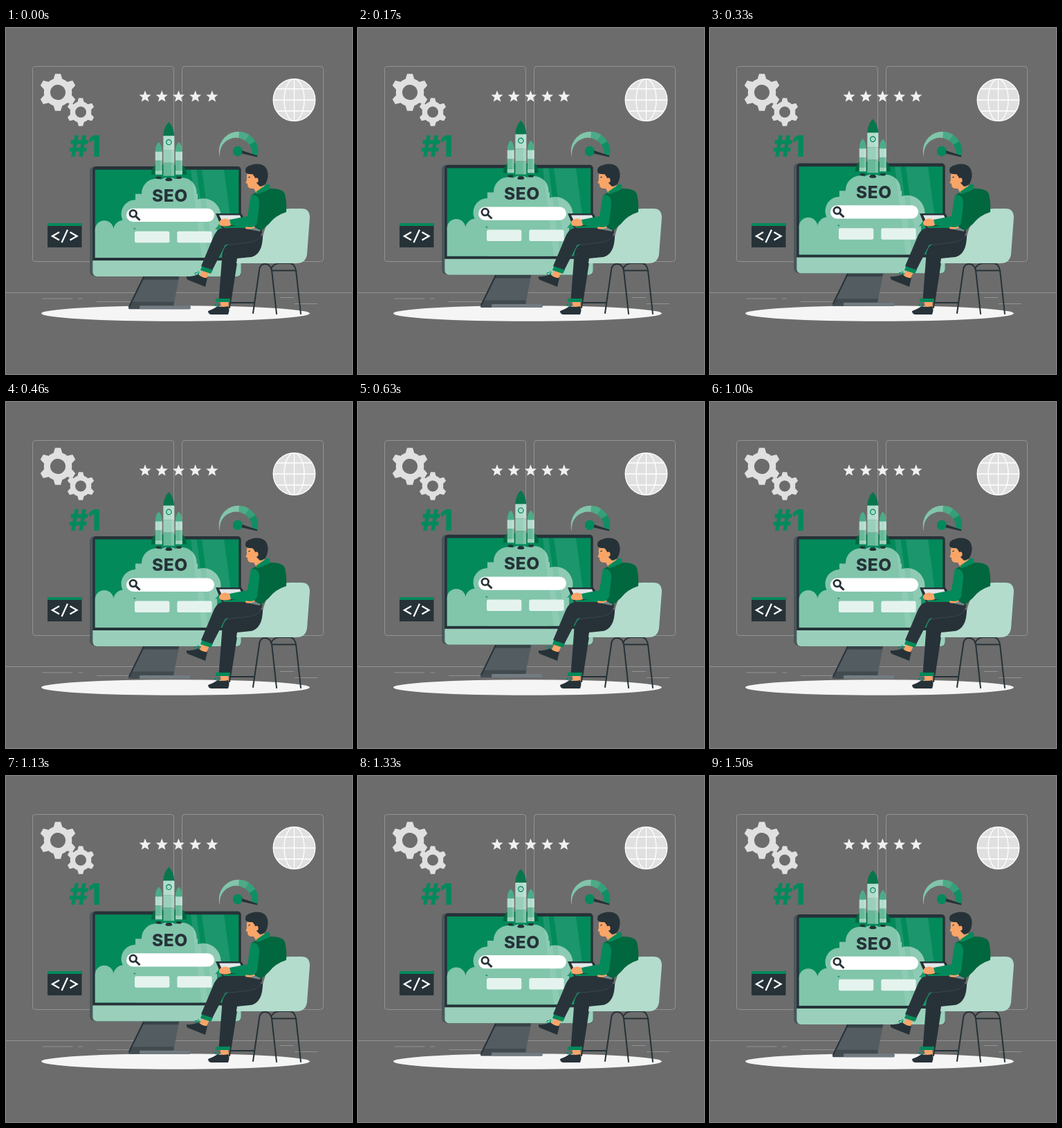
An HTML page with a canvas for the animation above (1.54 s loop, 500 by 500 pixels).

```html
<!DOCTYPE html>
<html lang="en">
<head>
<meta charset="utf-8">
<title>SEO launch</title>
<style>
  html, body { margin: 0; width: 100%; height: 100%; overflow: hidden; background: #6c6c6c; }
  canvas { display: block; width: 500px; height: 500px; }
</style>
</head>
<body>
<canvas id="stage"></canvas>
<script>
const LOOP = 1540, FPS = 24, FLOAT_PERIOD = 1500, FLOAT_HEIGHT = 10, PHASE = 20;
const BACK = '#6c6c6c', DARK = '#263238', GREEN = '#028a5b', DEEP = '#00673f',
  MINT = '#b3dccd', CHIN = '#9ad0bb', CLOUD = '#81c5ab', MID = '#4dab88',
  SKIN = '#f9a568', GREY = '#e0e0e0', LINE = '#989898';

const canvas = document.getElementById('stage');
const ctx = canvas.getContext('2d');
const ratio = window.devicePixelRatio || 1;
canvas.width = canvas.height = 500 * ratio;

function shape(d, color) {
  ctx.fillStyle = color;
  ctx.fill(new Path2D(d));
}
function stroke(d, color, width = 1) {
  ctx.strokeStyle = color;
  ctx.lineWidth = width;
  ctx.stroke(new Path2D(d));
}
function rect(x, y, w, h, color, radius = 0) {
  ctx.fillStyle = color;
  ctx.beginPath();
  ctx.roundRect(x, y, w, h, radius);
  ctx.fill();
}
function oval(x, y, rx, ry, color) {
  ctx.fillStyle = color;
  ctx.beginPath();
  ctx.ellipse(x, y, rx, ry, 0, 0, 7);
  ctx.fill();
}
const disc = (x, y, r, color) => oval(x, y, r, r, color);
function ring(x, y, rx, ry, color, width) {
  ctx.strokeStyle = color;
  ctx.lineWidth = width;
  ctx.beginPath();
  ctx.ellipse(x, y, rx, ry, 0, 0, 7);
  ctx.stroke();
}
function text(label, x, y, size, color, spacing = 0) {
  ctx.font = `800 ${size}px Inter, "Open Sans", sans-serif`;
  ctx.letterSpacing = spacing + 'px';
  ctx.fillStyle = color;
  ctx.fillText(label, x, y);
}

function gear(x, y, tip, body, hole) {
  ctx.save();
  ctx.translate(x, y);
  ctx.fillStyle = GREY;
  ctx.beginPath();
  ctx.arc(0, 0, body, 0, 7);
  ctx.arc(0, 0, hole, 7, 0, true);
  ctx.fill('evenodd');
  for (let i = 0; i < 6; i++) {
    const top = tip * 0.15, base = tip * 0.25;
    shape(`M${-base} ${-body + 2}L${-top} ${-tip}L${top} ${-tip}L${base} ${-body + 2}Z`, GREY);
    ctx.rotate(Math.PI / 3);
  }
  ctx.restore();
}

function star(x, y, radius) {
  ctx.fillStyle = '#f0f0f0';
  ctx.beginPath();
  for (let i = 0; i < 10; i++) {
    const r = i % 2 ? radius * 0.43 : radius, a = i * Math.PI / 5;
    ctx.lineTo(x + r * Math.sin(a), y - r * Math.cos(a));
  }
  ctx.fill();
}

function globe(x, y, r) {
  disc(x, y, r, GREY);
  ring(x, y, r, r, '#fff', 1.3);
  ring(x, y, 14.5, r, '#fff', 1.3);
  stroke(`M${x} ${y - r}V${y + r}M${x - r} ${y}H${x + r}M${x - 25.5} ${y - 16}h51M${x - 25.5} ${y + 16}h51`, '#fff', 1.3);
}

function gauge() {
  ctx.save();
  const band = new Path2D();
  band.arc(336, 178, 28.3, 0, 7);
  band.arc(332.3, 182, 23.4, 0, 7);
  ctx.clip(band, 'evenodd');
  const stops = [-195, -88, -57, -30, 17];
  [CLOUD, MID, '#349f78', '#0f8f63'].forEach((color, i) => {
    ctx.fillStyle = color;
    ctx.beginPath();
    ctx.moveTo(336, 178);
    ctx.arc(336, 178, 32, stops[i] * Math.PI / 180, stops[i + 1] * Math.PI / 180);
    ctx.fill();
  });
  ctx.restore();
  disc(335, 178, 7.2, GREEN);
  shape('M341 177L363.5 184.5L363 186.5L341 181.5Z', DARK);
}

function backdrop() {
  ctx.fillStyle = BACK;
  ctx.fillRect(0, 0, 500, 500);
  ctx.strokeStyle = LINE;
  ctx.lineWidth = 0.9;
  for (const x of [38.5, 254.5]) {
    ctx.beginPath();
    ctx.roundRect(x, 55.5, 204, 282, 4);
    ctx.stroke();
  }
  stroke('M0 382.5H500M52 391H96M104.5 391H111M131 395.5H180M396 389.5H416M417 398.5H450', LINE, 0.9);
  oval(245, 412.5, 194, 11.3, '#f5f5f5');
  gear(75, 93, 26.8, 20.3, 11);
  gear(108, 121.5, 20.3, 15.3, 8);
  for (let i = 0; i < 5; i++) star(201 + i * 24.2, 99.3, 9);
  globe(416.5, 104, 30.3);
  gauge();
  text('#1', 91, 185.5, 43, GREEN, -1);
  rect(60, 282, 49.5, 35, DARK);
  rect(60, 282, 49.5, 4, GREEN);
  stroke('M77 295L67 300.7L77 306.5M89 291.5L80.5 310M92.5 295L102.5 300.7L92.5 306.5', '#fff', 2.3);
}

function cloud() {
  for (const [x, y, r] of [[217, 239, 21], [254, 238, 21.5], [235, 238, 22], [187, 269, 20.5],
    [285, 272, 25.5], [142, 292, 13.5], [170, 293, 15]]) disc(x, y, r, CLOUD);
  rect(187, 240, 90, 92, CLOUD);
  rect(128, 291, 177, 42, CLOUD);
}

function sideRocket(x) {
  shape(`M${x - 5} 180Q${x - 5} 169 ${x} 165Q${x + 5} 169 ${x + 5} 180Z`, MID);
  rect(x - 5, 179, 10, 13, MINT);
  rect(x - 5, 192, 10, 14, '#67b999');
  rect(x - 5, 206, 10, 6, CHIN);
  rect(x + 2, 179, 3, 33, 'rgba(255,255,255,.15)');
}

function rockets() {
  shape('M216 198Q210 203 210 212H261Q260 203 255 198Z', DEEP);
  for (const [x, y] of [[220.5, 216], [235.3, 218], [250, 216]]) {
    rect(x - 3.5, y - 5, 7, 5, GREEN);
    oval(x, y + 0.5, 4, 1.8, DARK);
  }
  oval(235.3, 219.5, 5, 2, DARK);
  sideRocket(220.7);
  sideRocket(249.8);
  shape('M227 157Q228 143 235.3 136.3Q242.5 143 243.3 157Z', '#08764c');
  rect(227.3, 156, 16, 21, MINT);
  rect(227.3, 177, 16, 18, CHIN);
  rect(227.3, 195, 16, 19, '#67b999');
  rect(239, 156, 4.3, 58, 'rgba(255,255,255,.15)');
  disc(235.3, 165.3, 4.3, GREEN);
  disc(235.3, 165.3, 2.9, '#d9eee6');
  stroke('M234 164v3M236 163v4', MID, 0.8);
}

function monitor() {
  shape('M199 358H250.5L242 402H178Z', '#535c61');
  shape('M199 358H250.5L249 364H196Z', '#384348');
  shape('M183 396H243L242 402H178Z', '#414a4f');
  rect(177, 401.5, 89.5, 5, '#424c51', 1.5);
  rect(193, 401.5, 73.5, 5, '#717b80', 1.5);
  stroke('M199.5 359L178 403', DARK, 2);

  rect(121, 200.5, 25, 158, '#4c565b', 6);
  rect(125.3, 200.3, 214.4, 159, DARK, 5);
  rect(125.3, 336.3, 214.4, 23, CHIN, [0, 0, 6, 6]);
  rect(128.7, 205, 207.6, 127.3, GREEN);
  ctx.save();
  ctx.beginPath();
  ctx.rect(128.7, 205, 207.6, 127.3);
  ctx.clip();
  cloud();
  shape('M267 205H275.5L292 332H283ZM283 205H315L332 332H300Z', 'rgba(255,255,255,.1)');
  ctx.restore();

  text('SEO', 211, 250.8, 24.5, DARK, 0.6);
  rect(174, 261, 127, 19.3, '#fff', 9.6);
  ring(183.7, 268.5, 4.8, 4.8, DARK, 2.8);
  stroke('M187.2 272L193.5 278', DARK, 3);
  rect(186, 294, 50.3, 16.5, '#e5f3ee', 2.5);
  rect(247.3, 294, 50.3, 16.5, '#e5f3ee', 2.5);
  rockets();
}

function person() {
  // standing leg
  shape('M309 393H321L322 404H311Z', SKIN);
  shape('M292 409Q300 406 306 402Q314 404 321 402Q324 406 321 414H296Q292 413 292 409Z', DARK);
  shape('M371 300Q371 327 354 331L334 333L324.5 393H307.5L312 334Q312 314 326 311L352 303Z', DARK);
  shape('M303 391H324L323 396H303Z', GREEN);
  stroke('M309 400Q304 404 301 400Q304 397 309 400', GREEN, 1);
  // crossed leg
  shape('M284 350L294 353L289 363L279 359Z', SKIN);
  shape('M261 359Q270 360 278 356Q284 362 291 361L288 374L263 364Q260 362 261 359Z', DARK);
  shape('M370 290L320 288Q306 288 301 299L282 344L297 352L317 313L352 310Q366 308 370 296Z', '#29343a');
  stroke('M316 314L352 310Q366 308 369 298', '#46545b', 0.6);
  shape('M283 344.5L299 349.5L296 355L281 350Z', GREEN);
  stroke('M278 356Q272 358 273 354Q277 352 278 356Q280 351 277 352', GREEN, 1);
  // torso
  shape('M354 284L370 286L367 294L352 291Z', '#76858a');
  shape('M355 241Q363 236 379 232Q400 231 403 240Q406 252 405 266Q389 271 380 283L369 293L355 286Z', DEEP);
  // tablet
  shape('M303 268H338Q341 268 342 271L349 288Q349 290 346 290H316Q312 290 311 287Z', DARK);
  shape('M308 270.5H338L344 285H315Z', '#e2e7e9');
  shape('M313 287L347 285L348 289H315Z', GREEN);
  shape('M323 277Q316 274 311 277Q306 280 309 285Q316 288 325 285Z', SKIN);
  shape('M347 284Q356 282 360 288Q354 292 346 290Z', SKIN);
  shape('M354 241Q367 240 366 255L363 281Q361 288 353 288L325 285L323 277L349 272Z', GREEN);
  // head
  shape('M349 209Q347 214 348 219L346.5 224L349 225Q348 233 358 232L362 239L374 229L366 208Z', SKIN);
  shape('M361 237L378 225Q383 227 381 233L364 240Z', GREEN);
  shape('M346 208Q345 200 354 198Q367 194 375 201Q381 209 377 221Q374 229 367 229L362 224Q361 216 356 211Q349 212 346 208Z', DARK);
  oval(362, 220, 2.6, 3.5, SKIN);
  stroke('M350 216L353 215', DARK, 1);
}

function chair() {
  ctx.lineCap = 'round';
  stroke('M323 404L333 339M324 397H358M357 412L366 350Q367 341 374 341Q382 341 384 350L391 413', DARK, 2);
  stroke('M384 350.5H418M383 348Q386 341 394 340H411Q417 341 419 350L426 413', DARK, 2);
  ctx.lineCap = 'butt';
  shape('M326 340Q329 332 340 331L354 331Q366 328 369 312Q374 281 387 270Q397 261 410 261H427Q439 261 439 274L435 327Q433 340 420 340Z', MINT);
}

// Triangle wave held at a fixed frame rate.
function lift(time) {
  const held = Math.floor((time + 9) * FPS / 1000) * 1000 / FPS;
  const phase = (held + PHASE) % FLOAT_PERIOD / FLOAT_PERIOD;
  return FLOAT_HEIGHT * (1 - Math.abs(2 * phase - 1));
}

let start;
function draw(now) {
  start ??= now;
  ctx.setTransform(ratio, 0, 0, ratio, 0, 0);
  backdrop();
  ctx.save();
  ctx.translate(0, -lift((now - start) % LOOP));
  monitor();
  ctx.restore();
  chair();
  person();
  requestAnimationFrame(draw);
}
requestAnimationFrame(draw);
</script>
</body>
</html>
```
